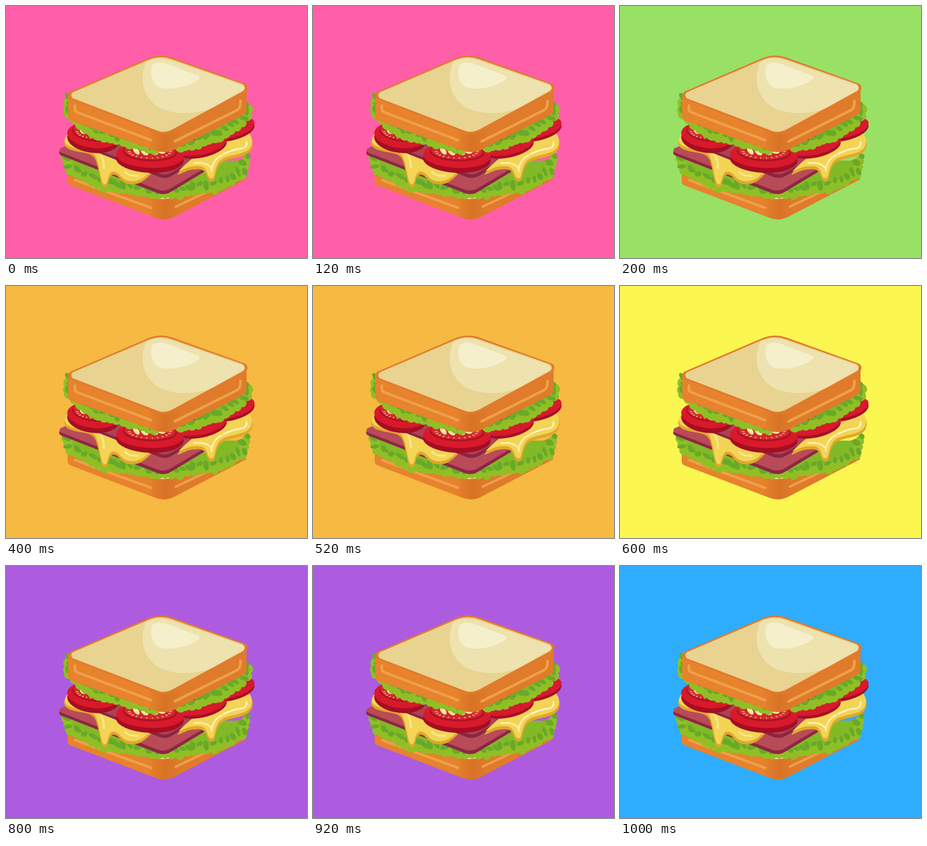
These frames come from a looping animation (498 by 417 pixels, 1200 ms). An HTML page with a canvas:

```html
<!DOCTYPE html>
<html lang="en">
<head>
<meta charset="utf-8">
<title>Sandwich</title>
<style>
html, body { margin: 0; width: 100%; height: 100%; overflow: hidden; }
canvas { display: block; width: 100vw; height: 100vh; }
</style>
</head>
<body>
<canvas id="stage" width="498" height="417"></canvas>
<script>
const ctx = document.getElementById('stage').getContext('2d');
const backdrops = ['#ff5fa8', '#98e165', '#f6b941', '#fcf651', '#ad5ce0', '#2eadff'];
const STEP = 200;

// The crust darkens towards the front corner.
const crust = ctx.createLinearGradient(235, 0, 290, 0);
crust.addColorStop(0, '#e7822d');
crust.addColorStop(.5, '#d87326');
crust.addColorStop(1, '#df7b2a');

const draw = (d, color) => {
  ctx.fillStyle = color;
  ctx.fill(new Path2D(d));
};
const line = (d, color, width) => {
  ctx.strokeStyle = color;
  ctx.lineWidth = width;
  ctx.lineCap = ctx.lineJoin = 'round';
  ctx.stroke(new Path2D(d));
};
const oval = (x, y, rx, ry, color, turn = 0) => {
  ctx.fillStyle = color;
  ctx.beginPath();
  ctx.ellipse(x, y, rx, ry, turn, 0, 7);
  ctx.fill();
};

// Rounded polygon: each corner is [x, y, radius].
function slab(corners, color) {
  const [a, b] = [corners.at(-1), corners[0]];
  ctx.beginPath();
  ctx.moveTo((a[0] + b[0]) / 2, (a[1] + b[1]) / 2);
  corners.forEach(([x, y, r], i) => {
    const next = corners[(i + 1) % corners.length];
    ctx.arcTo(x, y, next[0], next[1], r);
  });
  ctx.fillStyle = color;
  ctx.fill();
}

function seeded(seed) {
  return () => (seed = (seed * 16807) % 2147483647) / 2147483647;
}

// Lettuce edge: round lobes along a spine, with darker folds above them.
function frill(spine, seed) {
  const rand = seeded(seed), lobes = [];
  draw('M' + spine.join('L') + 'Z', '#82b926');
  spine.slice(1).forEach(([x, y], i) => {
    const [px, py] = spine[i];
    const n = Math.max(1, Math.round(Math.hypot(x - px, y - py) / 11));
    for (let k = 0; k < n; k++) {
      lobes.push([px + (x - px) * k / n, py + (y - py) * k / n + rand() * 4 - 2]);
    }
  });
  lobes.push(spine.at(-1));
  for (const [x, y] of lobes) oval(x, y, 8 + rand(), 6.5 + rand() * 2.5, '#90bf25', rand() * 3);
  for (const [x, y] of lobes) {
    oval(x + rand() * 8 - 4, y - 6 - rand() * 5, 5 + rand() * 4, 3 + rand() * 2, '#68a92a', rand() * 2 - .5);
  }
}

function bottomBread() {
  draw('M102 250V290Q102 295 107 297L246 350Q262 357 278 349L397 287V250L262 300Z', crust);
  line('M114 288L240 334', '#efa04a', 4);
  line('M281 332L340 304', '#efa04a', 4);
  line('M250 317Q262 320 274 316', '#f8dca0', 2.5);
}

function bottomLettuce() {
  frill([[100, 254], [106, 270], [132, 283], [163, 299], [240, 311], [288, 311], [345, 303], [391, 279], [397, 256]], 41);
}

function ham() {
  slab([[80, 243, 5], [200, 190, 20], [380, 243, 8], [262, 314, 26]], '#8f2544');
  slab([[82, 239, 4], [200, 188, 20], [380, 238, 8], [262, 308, 26]], '#b94b58');
}

function upperHam() {
  slab([[145, 240, 3], [190, 215, 4], [372, 225, 8], [264, 287, 24]], '#8b2541');
  slab([[145, 236, 3], [190, 213, 4], [372, 220, 8], [264, 281, 24]], '#ad4257');
}

// Melted slice: the same shape twice, its rim showing below.
function melt(d) {
  ctx.save();
  ctx.translate(0, 4);
  draw(d, '#e2a72c');
  line(d, '#e2a72c', 2);
  ctx.restore();
  draw(d, '#f3d455');
}

function leftCheese() {
  melt('M102 212Q92 224 103 231C120 240 142 234 149 250S156 294 163 295S167 274 178 274S190 290 208 290S232 280 245 268L190 225Z');
  line('M112 229Q134 228 148 237T162 268', '#fae693', 3);
  line('M197 274Q202 282 218 281', '#fae693', 3);
}

function rightCheese() {
  melt('M400 209Q411 219 405 233C395 250 360 243 351 260S347 286 339 285S336 265 318 265S296 270 285 274Q306 250 346 228Z');
  line('M311 260Q325 258 334 263T340 273Q342 254 357 247', '#fff1b5', 2.5);
  line('M360 245Q377 237 388 236T398 225', '#fff5ce', 2.5);
}

function backTomato(x, y, rx) {
  oval(x, y + 2, rx, 18, '#a90f24', -.2);
  oval(x, y - 2, rx, 17, '#d71a2e', -.2);
}

function tomato(x, y, rx, turn) {
  oval(x, y + 7, rx, 22, '#a50e22', turn);
  oval(x, y, rx, 21, '#d8192b', turn);
  oval(x, y - 5, rx * .8, 15, '#ac1224', turn);
  oval(x, y - 7, rx * .76, 14, '#d0282f', turn);
  for (let a = .1; a < 3.1; a += .27) {
    const mark = k => `${x + Math.cos(a) * rx * k} ${y - 7 + Math.sin(a) * 19 * k}`;
    line(`M${mark(.58)}L${mark(.65)}`, '#f5b76a', 1.5);
  }
  for (const k of [-.4, -.16, .12, .34]) {
    oval(x + k * rx, y - 4 - 8 * Math.abs(k), rx * .13, 4, '#f5e4a0', .5 - k);
  }
}

function tomatoes() {
  backTomato(370, 203, 42);
  backTomato(322, 231, 44);
  tomato(144, 214, 43, .12);
  tomato(238, 247, 56, .04);
}

function topLettuce() {
  frill([[102, 161], [104, 180], [142, 211], [246, 238]], 7);
  frill([[288, 237], [318, 229], [345, 222], [372, 205], [399, 184], [401, 170]], 23);
}

function topBread() {
  draw('M103 147V183Q103 188 108 190L246 239Q262 245 278 238L393 180Q398 177 398 172V134Z', crust);
  slab([[92, 148, 7], [255, 78, 55], [411, 134, 8], [263, 215, 30]], '#e27a2c');
  slab([[98, 148, 6], [255, 81, 53], [405, 134, 7], [263, 211, 28]], '#e8d391');
  draw('M233 91C220 115 224 150 253 168C278 181 318 180 344 167L392 139Q398 135 391 131L271 89Q251 83 233 91Z', '#eee2ae');
  draw('M242 98C237 114 243 132 258 136C278 140 307 131 319 121Q323 117 317 115L270 97Q251 90 242 98Z', '#f6efcb');
  line('M114 165V171Q114 174 118 176L240 222', '#eea048', 4.5);
  line('M279 224L383 172Q388 169 388 157', '#eea048', 4.5);
}

const layers = [bottomBread, bottomLettuce, ham, leftCheese, upperHam, rightCheese, tomatoes, topLettuce, topBread];

const start = performance.now();
function tick() {
  const now = performance.now() - start;
  ctx.fillStyle = backdrops[Math.floor(now / STEP) % backdrops.length];
  ctx.fillRect(0, 0, 498, 417);
  layers.forEach(layer => layer());
  requestAnimationFrame(tick);
}
tick();
</script>
</body>
</html>
```
